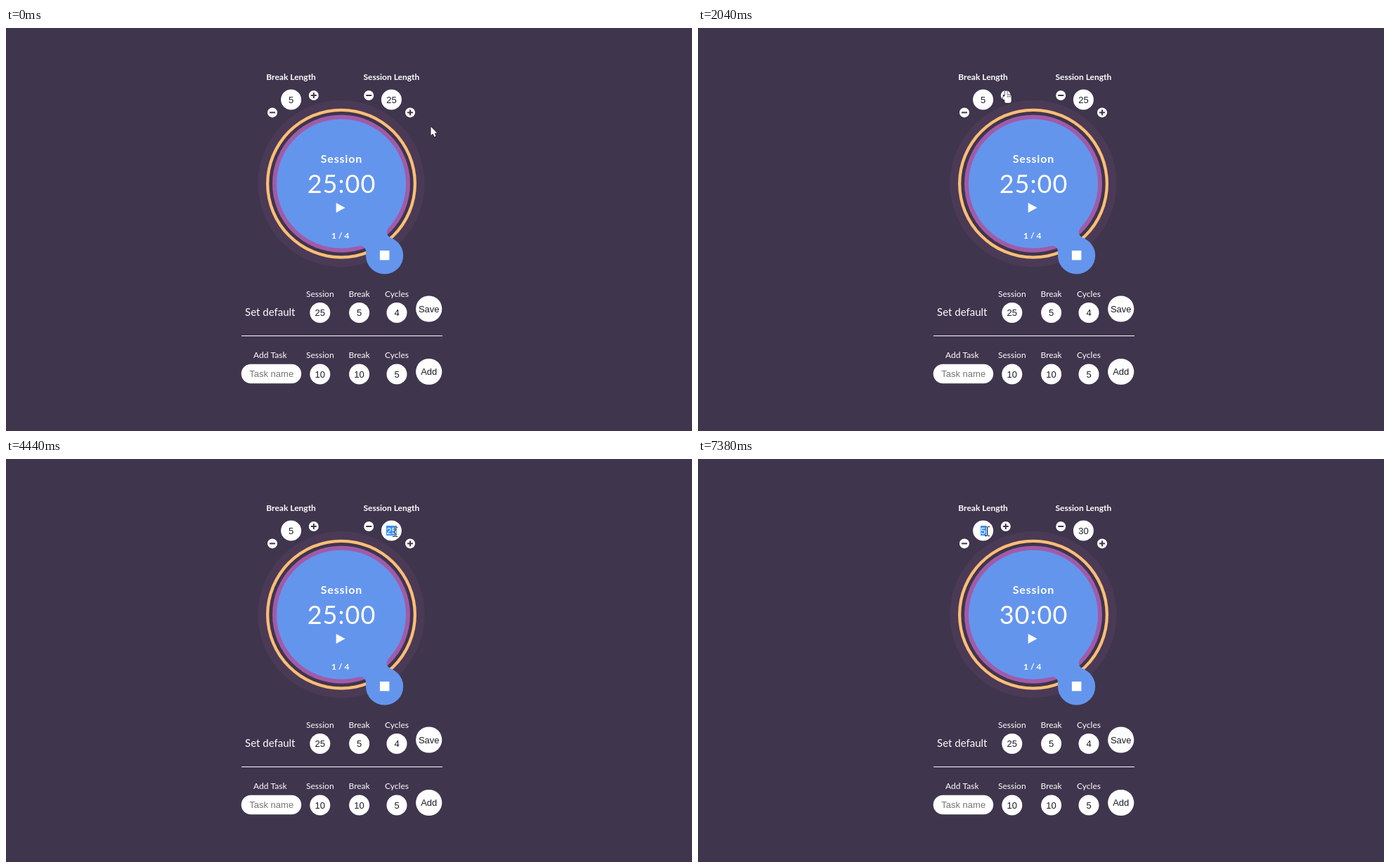
These frames come from a looping animation (976x574 px, 8000 ms). An HTML page with a canvas:

```html
<!DOCTYPE html>
<html lang="en">
<head>
<meta charset="utf-8">
<title>Session timer</title>
<style>
  html, body { margin: 0; width: 100%; height: 100%; overflow: hidden; background: #3f354d; }
  canvas { display: block; }
</style>
</head>
<body>
<canvas id="stage" width="976" height="574"></canvas>
<script>
const ctx = document.getElementById('stage').getContext('2d');
const LOOP = 8000, STEP = 77, BLINK = 530;
const BG = '#3f354d', BLUE = '#6495ed', PURPLE = '#a05ba9', ORANGE = '#ffbe76';
const INK = '#1d1a26', SELECT = '#3390ff', WHITE = '#fff';
const UI = 'Lato, sans-serif';
const FIELD = '13px "Liberation Sans", Arial, sans-serif';

// The two length controls mirror each other about the dial's axis.
const CX = 477, CY = 221.7;
const control = (name, side) => ({
  name,
  field: { x: CX + side * 71.4, y: 102 },
  inner: { x: CX + side * 39.2, y: 96, plus: side < 0 },
  outer: { x: CX + side * 98, y: 120.4, plus: side > 0 }
});
const rest = control('Break', -1), work = control('Session', 1);
const controls = [rest, work];
const shift = (p, dx, dy) => ({ x: p.x + dx, y: p.y + dy });

const START = { x: 604, y: 140 };
const MOVES = [
  { from: 70, to: 510, goal: shift(work.outer, -4, -2) },
  { from: 810, to: 1250, goal: { x: 533, y: 116 } },
  { from: 1330, to: 1430, goal: work.inner },
  { from: 1580, to: 2350, goal: shift(rest.inner, -4, -7) },
  { from: 2430, to: 2730, goal: shift(rest.outer, 7, 0) },
  { from: 2810, to: 3200, goal: shift(rest.outer, -3, 1) },
  { from: 3270, to: 4040, goal: shift(work.field, 12, -4) },
  { from: 4210, to: 4440, goal: shift(work.field, 4.8, 2) },
  { from: 6530, to: 7300, goal: shift(rest.field, 6, 0.5) }
];

const EVENTS = [
  { at: 0, work: '25', rest: '5', minutes: 25, selected: '' },
  { at: 810, work: '26', minutes: 26 },
  { at: 1580, work: '25', minutes: 25 },
  { at: 2430, rest: '6' },
  { at: 3270, rest: '5' },
  { at: 4040, selected: 'work' },
  { at: 4820, work: '3', selected: '', typing: true },
  { at: 4900, work: '30' },
  { at: 6210, minutes: 30, typing: false },
  { at: 7380, selected: 'rest' }
];

const stateAt = t => Object.assign({}, ...EVENTS.filter(e => e.at <= t));
const easeOut = p => 1 - (1 - p) ** 3;

function pointerAt(t) {
  let pos = START;
  for (const { from, to, goal } of MOVES) {
    if (t < from) break;
    const steps = Math.floor((t - from) / STEP + 0.2) + 1;
    const k = easeOut(Math.min(1, steps * STEP / (to - from + STEP)));
    pos = shift(pos, (goal.x - pos.x) * k, (goal.y - pos.y) * k);
  }
  return pos;
}

function disc(x, y, r, color) {
  ctx.fillStyle = color;
  ctx.beginPath();
  ctx.arc(x, y, r, 0, Math.PI * 2);
  ctx.fill();
}

function rect(x, y, w, h, color = WHITE) {
  ctx.fillStyle = color;
  ctx.fillRect(x, y, w, h);
}

function poly(points, x, y) {
  ctx.beginPath();
  for (const [px, py] of points) ctx.lineTo(x + px, y + py);
  ctx.closePath();
}

function label(text, x, y, font, color = WHITE, spacing = 0) {
  ctx.font = font;
  ctx.letterSpacing = spacing + 'px';
  ctx.textAlign = 'center';
  ctx.fillStyle = color;
  ctx.fillText(text, x + spacing / 2, y);
}

function field({ x, y }, text, { r = 14.5, selected = false, caret = false } = {}) {
  disc(x, y, r, WHITE);
  ctx.font = FIELD;
  ctx.letterSpacing = '0px';
  const w = ctx.measureText(text).width;
  if (selected) rect(Math.round(x - w / 2), y - 7, Math.ceil(w), 14, SELECT);
  label(text, x, y + 4.5, FIELD, selected ? WHITE : INK);
  if (caret) rect(Math.round(x + w / 2), y - 8, 1, 15, '#000');
}

function button({ x, y, plus }) {
  disc(x, y, 7, WHITE);
  rect(x - 4, y - 1, 8, 2, BG);
  if (plus) rect(x - 1, y - 4, 2, 8, BG);
}

// Concave bridge between the dial and the stop button.
function neck(r, stop, stopR) {
  const axis = Math.atan2(stop.y - CY, stop.x - CX);
  const on = (x, y, radius, angle) => [x + radius * Math.cos(angle), y + radius * Math.sin(angle)];
  const [mx, my] = on(CX, CY, r, axis);
  ctx.beginPath();
  ctx.moveTo(CX, CY);
  for (const side of [1, -1]) {
    const a = on(CX, CY, r, axis + side * 0.31);
    const c = on(mx, my, 12, axis + side * Math.PI / 2);
    const b = on(stop.x, stop.y, stopR, axis + Math.PI - side * 1.05);
    const [first, last] = side > 0 ? [a, b] : [b, a];
    ctx.lineTo(...first);
    ctx.quadraticCurveTo(...c, ...last);
  }
  ctx.fillStyle = BLUE;
  ctx.fill();
}

function dial(minutes) {
  const stop = { x: 538.6, y: 324 };
  disc(CX, CY, 118.7, '#4a3a56');
  disc(CX, CY, 107, ORANGE);
  disc(CX, CY, 102.7, BG);
  disc(CX, CY, 98, PURPLE);
  disc(CX, CY, 92, BLUE);
  neck(92, stop, 26.6);
  disc(stop.x, stop.y, 26.6, BLUE);
  rect(stop.x - 6.7, stop.y - 7, 13.5, 13.5);

  label('Session', CX, 192, '700 16px ' + UI, WHITE, 0.8);
  label(minutes + ':00', CX, 235, '36px ' + UI, WHITE, 1);
  poly([[0, -7], [12.8, 0], [0, 7]], 469.7, 256);
  ctx.fill();
  label('1 / 4', 475.7, 300, '700 12px ' + UI);
}

function row(y, title, titleY, titleSize, values, action, actionY) {
  label(title, 375.8, titleY, titleSize + 'px ' + UI);
  ['Session', 'Break', 'Cycles'].forEach((name, i) => {
    const x = 446.8 + i * 54.6;
    const p = { x: i === 1 ? x + 1.2 : x, y };
    label(name, p.x, y - 23, '12px ' + UI);
    field(p, values[i]);
  });
  field({ x: 601.7, y: actionY }, action, { r: 18.6 });
}

function forms() {
  row(405.5, 'Set default', 409.5, 15, [25, 5, 4], 'Save', 400);
  rect(335, 438, 286, 1);
  row(493, 'Add Task', 470, 12, [10, 10, 5], 'Add', 489.5);
  ctx.fillStyle = WHITE;
  ctx.beginPath();
  ctx.roundRect(334.7, 478.7, 85.5, 27.6, 13.8);
  ctx.fill();
  label('Task name', 377.7, 496.5, FIELD, '#757575');
}

function textCursor(x, y) {
  const left = Math.floor(x), top = Math.round(y) - 7;
  ctx.globalCompositeOperation = 'difference';
  rect(left, top + 1, 1, 12);
  for (const edge of [top, top + 13]) {
    rect(left - 3, edge, 3, 1);
    rect(left + 1, edge, 3, 1);
  }
  ctx.globalCompositeOperation = 'source-over';
}

function outlined() {
  ctx.lineJoin = 'round';
  ctx.lineWidth = 1.2;
  ctx.strokeStyle = '#15121c';
  ctx.fillStyle = WHITE;
  ctx.stroke();
  ctx.fill();
}

function handCursor(x, y) {
  ctx.beginPath();
  ctx.roundRect(x - 1, y, 3, 12, 1.5);
  ctx.roundRect(x - 4, y + 8, 5, 5, 2);
  ctx.roundRect(x - 1.5, y + 5.5, 9.5, 12, [1, 3, 3, 2]);
  outlined();
  for (const dx of [2.2, 4.2, 6.2]) rect(x + dx, y + 6.5, 0.6, 3, '#15121c');
}

function arrowCursor(x, y) {
  poly([[0, 0], [0, 12.5], [2.9, 9.9], [5, 14.6], [7.2, 13.6], [5.2, 9.2], [9, 9.2]], x + 0.5, y + 0.5);
  outlined();
}

function pointer({ x, y }) {
  const near = (p, r) => Math.hypot(p.x - x, p.y - y) < r;
  if (controls.some(c => near(c.field, 14.5))) textCursor(x, y);
  else if (controls.some(c => near(c.inner, 9.5) || near(c.outer, 9.5))) handCursor(x, y);
  else arrowCursor(x, y);
}

function draw(t) {
  const state = stateAt(t);
  const caret = state.typing && Math.floor(Math.max(0, t - 4900) / BLINK) % 2 === 0;
  rect(0, 0, 976, 574, BG);
  dial(state.minutes);
  for (const c of controls) {
    label(c.name + ' Length', c.field.x, 73.5, '700 12px ' + UI);
    button(c.inner);
    button(c.outer);
  }
  field(rest.field, state.rest, { selected: state.selected === 'rest' });
  field(work.field, state.work, { selected: state.selected === 'work', caret });
  forms();
  pointer(pointerAt(t));
}

const begin = performance.now();
function tick() {
  draw((performance.now() - begin) % LOOP);
  requestAnimationFrame(tick);
}
tick();
</script>
</body>
</html>
```
